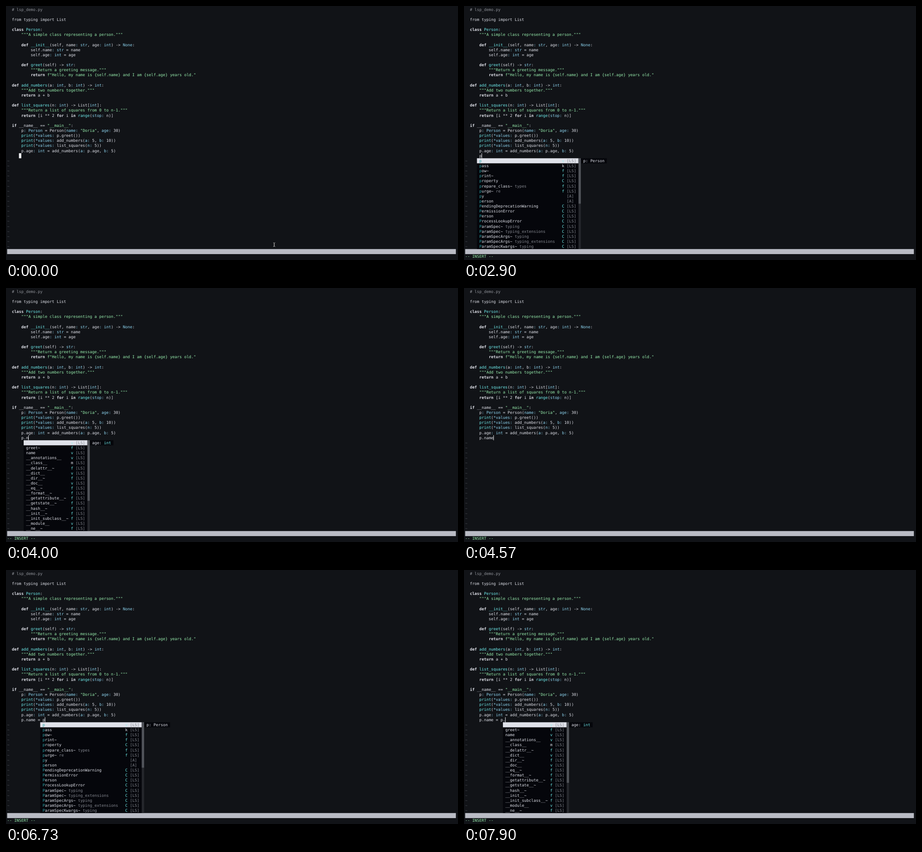
These frames come from a looping animation (998x561 px, 8 s). An HTML page with a canvas:

```html
<!DOCTYPE html>
<html lang="en">
<head>
<meta charset="utf-8">
<title>Code completion</title>
<style>
html, body { margin: 0; width: 100%; height: 100%; overflow: hidden; background: #111317; }
canvas { display: block; }
</style>
</head>
<body>
<canvas id="stage" width="998" height="561"></canvas>
<script>
const ctx = document.getElementById('stage').getContext('2d');
const LOOP = 8000;
const CELL = 5.215, ROW = 11.14, LEFT = 2.5, TOP = 2.1;
const FONT = '8.66px "DejaVu Sans Mono", monospace';
const C = {
  bg: '#111317', fg: '#e0e2ea', comment: '#90939a', string: '#98efae',
  func: '#70eeee', type: '#8fd8f4', tilde: '#4c4f56', bar: '#b9bbc4',
  menu: '#05060b', match: '#2ba5aa', dim: '#858890', pale: '#a5eef0',
  track: '#25272c', thumb: '#505359'
};

const SOURCE = `# lsp_demo.py

from typing import List

class Person:
    """A simple class representing a person."""

    def __init__(self, name: str, age: int) -> None:
        self.name: str = name
        self.age: int = age

    def greet(self) -> str:
        """Return a greeting message."""
        return f"Hello, my name is {self.name} and I am {self.age} years old."

def add_numbers(a: int, b: int) -> int:
    """Add two numbers together."""
    return a + b

def list_squares(n: int) -> List[int]:
    """Return a list of squares from 0 to n-1."""
    return [i ** 2 for i in range(stop: n)]

if __name__ == "__main__":
    p: Person = Person(name: "Doria", age: 30)
    print(*values: p.greet())
    print(*values: add_numbers(a: 5, b: 10))
    print(*values: list_squares(n: 5))
    p.age: int = add_numbers(a: p.age, b: 5)`.split('\n');

// Each item: word | module | kind | provider
const parse = text => text.trim().split('\n').map(line => line.split('|'));

const WORDS = parse(`
p||v|LS
pass||k|LS
pow~||f|LS
print~||f|LS
property||C|LS
prepare_class~|types|f|LS
purge~|re|f|LS
py|||A
person|||A
PendingDeprecationWarning||C|LS
PermissionError||C|LS
Person||C|LS
ProcessLookupError||C|LS
ParamSpec~|typing|C|LS
ParamSpec~|typing_extensions|C|LS
ParamSpecArgs~|typing|C|LS
ParamSpecArgs~|typing_extensions|C|LS
ParamSpecKwargs~|typing|C|LS`);

const MEMBERS = parse(`
age||v|LS
greet~||f|LS
name||v|LS
__annotations__||v|LS
__class__||m|LS
__delattr__~||f|LS
__dict__||v|LS
__dir__~||f|LS
__doc__||v|LS
__eq__~||f|LS
__format__~||f|LS
__getattribute__~||f|LS
__getstate__~||f|LS
__hash__~||f|LS
__init__~||f|LS
__init_subclass__~||f|LS
__module__||v|LS
__ne__~||f|LS`);

// base: width of the word column; cols: menu width; thumb: rows of scrollbar thumb
const wordMenu = col => ({ col, items: WORDS, base: 34, cols: 43, thumb: 9, matched: 1, doc: 'p: Person' });
const memberMenu = col => ({ col, items: MEMBERS, base: 18, cols: 27, thumb: 12, matched: 0, doc: 'age: int' });
const nameMenu = col => ({ col, items: [MEMBERS[2]], base: 4, cols: 16, thumb: 0, matched: 1, doc: 'name: str' });

const STEPS = [
  { at: 0, text: '' },
  { at: 2730, text: 'p', menu: wordMenu(5) },
  { at: 3730, text: 'p.' },
  { at: 3770, text: 'p.', menu: memberMenu(7) },
  { at: 4000, text: 'p.n', menu: memberMenu(7) },
  { at: 4070, text: 'p.n', menu: nameMenu(7) },
  { at: 4570, text: 'p.name' },
  { at: 5070, text: 'p.name ' },
  { at: 5370, text: 'p.name =' },
  { at: 5530, text: 'p.name = ' },
  { at: 6370, text: 'p.name = p' },
  { at: 6400, text: 'p.name = p', menu: wordMenu(14) },
  { at: 6800, text: 'p.name = p' },
  { at: 7600, text: 'p.name = p.' },
  { at: 7870, text: 'p.name = p.', menu: memberMenu(16) }
];
const POINTER_OFF = 1370, INSERT_ON = 1630, EDIT_ROW = 29;

const px = col => LEFT + col * CELL;
const py = row => TOP + row * ROW;

function put(text, col, row, color = C.fg, bold = false) {
  ctx.font = (bold ? 'bold ' : '') + FONT;
  ctx.fillStyle = color;
  ctx.fillText(text, px(col), py(row) + 8.5);
}

function box(col, row, cols, rows, color) {
  ctx.fillStyle = color;
  ctx.fillRect(px(col), py(row), cols * CELL, rows * ROW);
}

const RULES = [
  [/^#.*/, C.comment],
  [/""".*?"""|f?"[^"]+"/, C.string],
  [/\b(?:class|def|return|if|for|in)\b/, C.fg, true],
  [/(?<=def |class )\w+|\b(?:print|range)\b/, C.func],
  [/\*?\b\w+:(?= (?!str|int|Person))/, C.type],
  [/(?:: )?\b(?:str|int|None|Person)\b(?!\()/, C.type]
];
const TOKEN = new RegExp(RULES.map(([re]) => `(${re.source})`).join('|'), 'g');

function putCode(line, row) {
  let end = 0;
  for (const m of line.matchAll(TOKEN)) {
    put(line.slice(end, m.index), 2 + end, row);
    const [, color, bold] = RULES[m.slice(1).findIndex(g => g !== undefined)];
    put(m[0], 2 + m.index, row, color, bold);
    end = m.index + m[0].length;
  }
  put(line.slice(end), 2 + end, row);
}

function drawMenu({ col, items, base, cols, thumb, matched, doc }) {
  const top = EDIT_ROW + 1;
  box(col, top, cols, items.length, C.menu);
  box(col, top, cols, 1, C.fg);
  items.forEach(([word, module, kind, from], i) => {
    const row = top + i, picked = i === 0;
    put(word.slice(0, matched), col + 1, row, C.match);
    put(word.slice(matched), col + 1 + matched, row);
    put(module, col + 2 + word.length, row, C.dim);
    const kindColor = picked ? C.pale : /[km]/.test(kind) ? C.fg : C.func;
    const kindCol = col + base + 2 + (base > 30 ? 0 : 0);
    put(kind, kindCol, row, kindColor);
    put(`[${from}]`, kindCol + 2, row, C.dim);
  });
  let docCol = col + cols;
  if (thumb) {
    box(docCol, top, 1, items.length, C.track);
    box(docCol, top, 1, thumb, C.thumb);
    docCol++;
  }
  box(docCol, top, doc.length + 2, 1, C.menu);
  const split = doc.indexOf(' ') + 1;
  put(doc.slice(0, split), docCol + 1, top);
  put(doc.slice(split), docCol + 1 + split, top, doc.endsWith('int') || doc.endsWith('str') ? C.func : C.fg);
}

function drawPointer() {
  const beam = new Path2D('M590 522.8Q592 522.8 592.2 524.5Q592.4 522.8 594.4 522.8M592.2 524V530.5M590 531.6Q592 531.6 592.2 530Q592.4 531.6 594.4 531.6M591 527.8H593.4');
  ctx.strokeStyle = '#000';
  ctx.lineWidth = 2;
  ctx.stroke(beam);
  ctx.strokeStyle = '#dedede';
  ctx.lineWidth = 0.9;
  ctx.stroke(beam);
}

function draw(t) {
  ctx.fillStyle = C.bg;
  ctx.fillRect(0, 0, 998, 561);
  SOURCE.forEach(putCode);
  for (let row = EDIT_ROW + 1; row < 48; row++) put('~', 0, row, C.tilde);
  box(0, 48, 190, 1, C.bar);

  const step = STEPS.findLast(s => s.at <= t);
  put(step.text, 6, EDIT_ROW);
  if (step.menu) drawMenu(step.menu);

  if (t < INSERT_ON) {
    box(5, EDIT_ROW, 1, 1, '#f2f3f6');
  } else {
    put('-- INSERT --', 0, 49, C.string);
    ctx.fillStyle = '#f2f3f6';
    ctx.fillRect(px(6 + step.text.length) - 0.3, py(EDIT_ROW), 1, ROW);
  }
  if (t < POINTER_OFF) drawPointer();
}

ctx.textRendering = 'geometricPrecision';
const start = performance.now();
function tick() {
  draw((performance.now() - start) % LOOP);
  requestAnimationFrame(tick);
}
tick();
</script>
</body>
</html>
```
